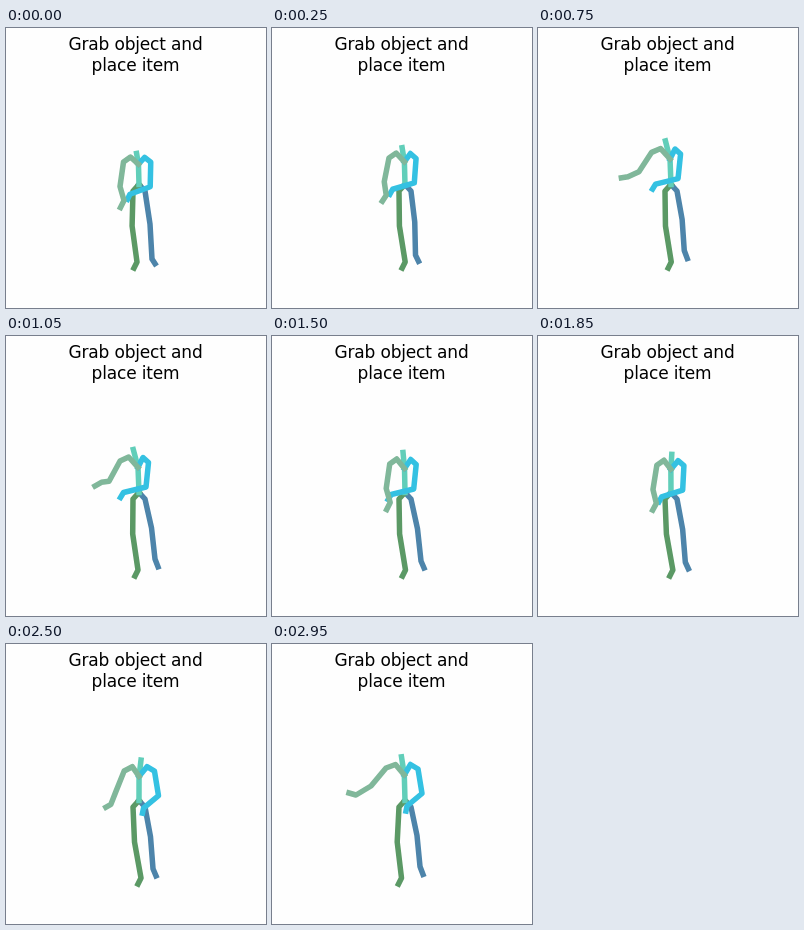
An HTML page that plays this animation: 260x280 px, repeating every 3 s.

```html
<!DOCTYPE html>
<html lang="en">
<head>
<meta charset="utf-8">
<title>Grab object and place item</title>
<style>
html, body { margin: 0; width: 100%; height: 100%; overflow: hidden; background: #fefefe; }
svg { display: block; width: 260px; height: 280px; }
text { font: 17px "DejaVu Sans", sans-serif; letter-spacing: -0.17px; text-anchor: middle; fill: #000; }
polyline { fill: none; stroke-width: 5.5; stroke-linecap: square; stroke-linejoin: round; }
</style>
</head>
<body>
<svg viewBox="0 0 260 280">
  <text x="129.5" y="22">Grab object and</text>
  <text x="129.5" y="43">place item</text>
  <g id="figure"></g>
</svg>
<script>
const LOOP = 3000, STEP = 50;
const TIMES = [0, 500, 800, 1050, 1500, 2150, 2500, 2950];

// A few motions drive the whole body; one value per key time.
const MOTION = {
  dip: [8.5, 1.5, 0, 0.5, 2.5, 4.3, 2.2, 0],
  lean: [0.5, 0, -1, -1, 0.7, 2.5, 2.5, 0],
  reach: [0, 0.25, 0.84, 0.65, 0, 0.1, 0.45, 1],
  raise: [0, 0, 0.5, 1, 0, 0, 0, 0],
  tuck: [0.3, 0, 0, 0, 0, 0.5, 1, 1],
  sway: [-1.5, 2, 0.5, -0.5, 1, 3, 2.5, -3],
  stride: [0, -4, 1, 3, 3, 0, 1, 2]
};

// Arm poses from collar to hand.
const HANG = [[124, 120.5], [117, 125.5], [113.5, 150], [117.5, 164], [114, 171]];
const REACH_LOW = [[123.5, 120.5], [114, 124], [99, 142], [84, 151], [77, 149]];
const REACH_HIGH = [[123.5, 120.5], [114, 124], [99, 142], [85, 136], [77, 138]];
const HOLD = [[138, 121], [143.5, 126], [141, 150.5], [118.5, 156], [115.5, 161]];
const TUCK = [[138.5, 120.5], [146, 125], [150, 149.5], [135, 162], [134, 167]];
const ROOT = [133, 156.5];

const figure = document.getElementById("figure");
const [leftLeg, rightLeg, spine, leftArm, rightArm] =
  ["#4d84aa", "#5b9965", "#61ceb9", "#34c1e2", "#80b79a"].map(color => {
    const line = document.createElementNS("http://www.w3.org/2000/svg", "polyline");
    line.setAttribute("stroke", color);
    figure.append(line);
    return line;
  });

const slope = (v, i) => (v[i + 1] - v[i]) / (TIMES[i + 1] - TIMES[i]);

// Smooth tangent that never overshoots a key.
function tangent(v, i) {
  if (i === 0) return slope(v, 0);
  if (i === v.length - 1) return slope(v, i - 1);
  const p = slope(v, i - 1), q = slope(v, i);
  return p * q > 0 ? 2 * p * q / (p + q) : 0;
}

function sample(v, t) {
  let i = 0;
  while (i < TIMES.length - 2 && t >= TIMES[i + 1]) i++;
  const span = TIMES[i + 1] - TIMES[i];
  const u = (t - TIMES[i]) / span, w = 1 - u;
  return v[i] * w * w * (1 + 2 * u) + v[i + 1] * u * u * (3 - 2 * u)
    + span * u * w * (w * tangent(v, i) - u * tangent(v, i + 1));
}

const mix = (a, b, u) => a.map(([x, y], i) => [x + (b[i][0] - x) * u, y + (b[i][1] - y) * u]);
const move = (pose, dx, dy) => pose.map(([x, y]) => [x + dx, y + dy]);
const join = (line, ...points) => line.setAttribute("points", points.join(" "));

function draw(ms) {
  const t = Math.floor(ms % LOOP / STEP) * STEP;
  const { dip, lean, reach, raise, tuck, sway, stride } = Object.fromEntries(
    Object.entries(MOTION).map(([name, v]) => [name, sample(v, t)]));

  const chest = [132.3 + 0.3 * lean, 131 + 0.6 * dip];
  const head = [129.5 + 2.2 * lean, 112.8 + 1.5 * dip];
  join(spine, ROOT, chest, head);

  join(leftLeg, ROOT, [139, 163], [144 + 0.5 * stride, 191.5 + 0.55 * dip],
    [146 + stride, 222.5 + dip], [149 + stride, 230.5 + 0.6 * dip]);
  join(rightLeg, ROOT, [127, 163], [127 + 0.6 * sway, 198],
    [132.5 + sway, 234], [129.5 + sway, 240]);

  const out = mix(REACH_LOW, REACH_HIGH, raise);
  join(leftArm, chest, ...move(mix(HOLD, TUCK, tuck), lean, dip));
  join(rightArm, chest, ...move(mix(HANG, out, reach), lean, dip));
}

const start = performance.now();
function tick() {
  draw(performance.now() - start);
  requestAnimationFrame(tick);
}
tick();
</script>
</body>
</html>
```
